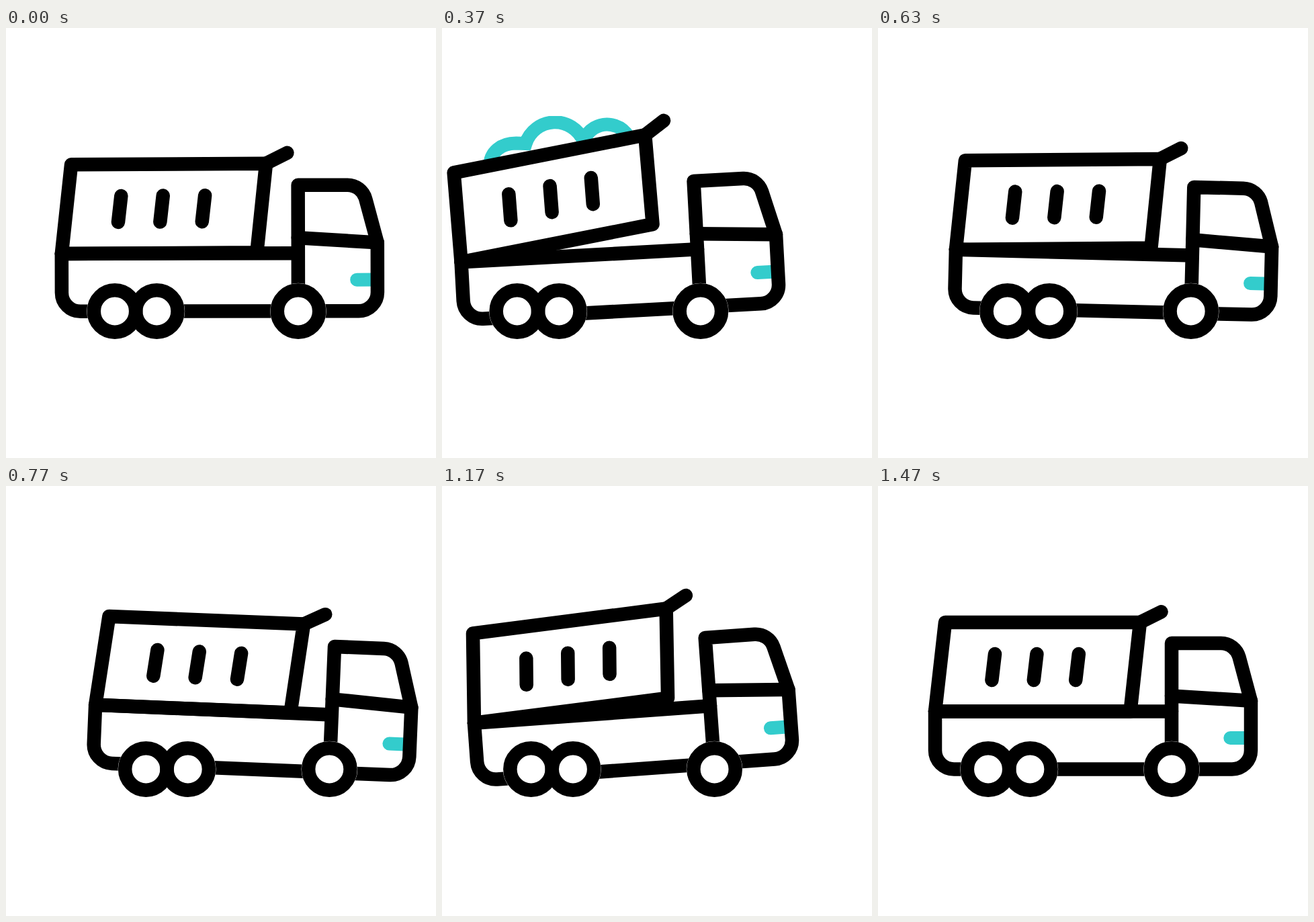
An HTML page for the animation above (1.67 s loop, 640 by 640 pixels).

```html
<!DOCTYPE html>
<html lang="en">
<head>
<meta charset="utf-8">
<title>Dump truck</title>
<style>
  html, body { margin: 0; width: 100%; height: 100%; overflow: hidden; background: #fff; }
  svg { display: block; width: 100vw; height: 100vh; }
  .ink { fill: none; stroke: #000; stroke-width: 20.5; stroke-linecap: round; stroke-linejoin: round; }
  .teal { fill: none; stroke: #33cccc; stroke-width: 20; }
</style>
</head>
<body>
<svg viewBox="0 0 640 640">
  <defs>
    <clipPath id="flat"><rect x="-120" y="-55" width="260" height="120"/></clipPath>
  </defs>

  <g id="cloud">
    <path class="teal" clip-path="url(#flat)"
      d="M-97 20C-97 -2 -80 -14.5 -58 -14.5L-43.7 -14A46 46 0 0 1 42.5 -17.6A37 37 0 0 1 114.5 -5.5V10"/>
  </g>

  <g id="body">
    <g id="bed" class="ink">
      <path fill="#fff" d="M85 335.5L100 203H390L375.5 335.5Z"/>
      <path d="M390 203L421.5 187.3"/>
      <g id="slots"></g>
    </g>
    <path class="teal" stroke-linecap="round" d="M524.3 375H553"/>
    <g class="ink">
      <path d="M85 335.5V393.5A28 28 0 0 0 113 421.5H527A28 28 0 0 0 555 393.5V320L537.5 254.7A28 28 0 0 0 510.5 234H437V421"/>
      <path d="M85 335.5H437M437 312.4L555 319.8"/>
    </g>
  </g>

  <g id="wheels"></g>
</svg>
<script>
const LOOP = 1670, FPS = 30;
const START = -1.3, END = 44; // steps at which the truck leaves and regains rest
const HUB_Y = 421.5, GAP = 62.4, WHEELS = [164, 164 + GAP, 437];

const $ = id => document.getElementById(id);
const place = (id, value) => $(id).setAttribute('transform', value);
const ease = p => p * p * (3 - 2 * p);

// Eases from rest through the turning points [step, value] and back to rest.
function swing(rest, ...turns) {
  const keys = [[START, rest], ...turns, [END, rest]];
  return n => {
    const i = keys.findIndex(([step]) => n < step);
    if (i < 0) return rest;
    const [a, from] = keys[i - 1], [b, to] = keys[i];
    return from + (to - from) * ease((n - a) / (b - a));
  };
}

const drive = swing(0, [9.9, -54.4], [22.2, 45.5], [33.4, -33.5]);
const pitch = swing(0, [10.7, -3.1], [22.2, 2.45], [35, -4.15]);
const tip = swing(0, [11.8, -8.15], [22.2, 0], [31.6, -4.5], [41, 0]);
const load = swing(266, [12.3, 184], [22.2, 266]);

const circle = (x, r, look) => `<circle cx="${x}" cy="${HUB_Y}" r="${r}" ${look}/>`;
$('wheels').innerHTML =
  WHEELS.map(x => circle(x, 41.8, 'fill="#fff"')).join('') +
  WHEELS.map(x => circle(x, 31.2, 'class="ink"')).join('');
$('slots').innerHTML = [0, 1, 2].map(i =>
  `<path d="M${174 + i * GAP} 250l-4.6 39"/>`).join('');

function draw(ms) {
  const n = Math.min(49, Math.floor((ms % LOOP + 4) * FPS / 1000));
  const x = drive(n), y = load(n);
  place('wheels', `translate(${x} 0)`);
  place('body', `translate(${x} 0) rotate(${pitch(n)} 320 ${HUB_Y})`);
  place('bed', `rotate(${tip(n)} 85 335.5)`);
  place('cloud', `translate(${x + 239 - y / 10} ${y})`);
}

const start = performance.now();
function tick() {
  draw(performance.now() - start);
  requestAnimationFrame(tick);
}
draw(0);
requestAnimationFrame(tick);
</script>
</body>
</html>
```
